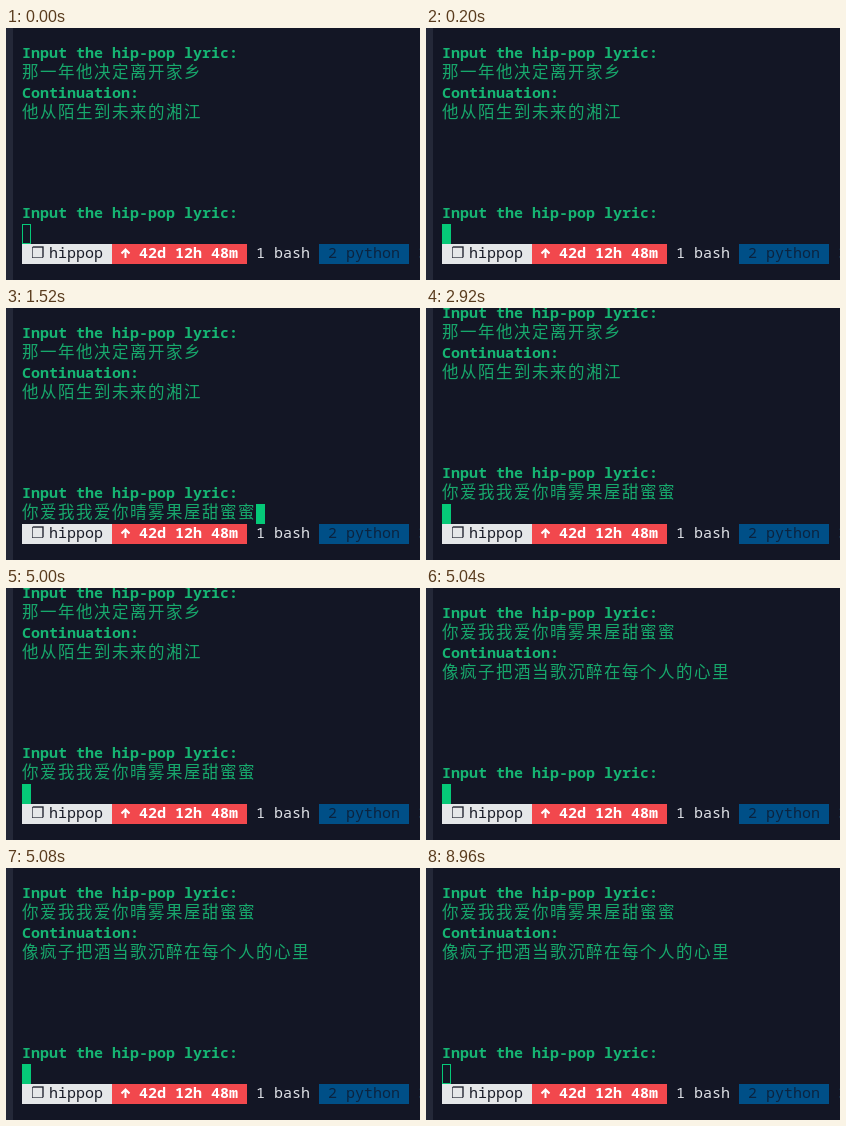
An HTML page with a canvas that plays this animation: 414x252 px, repeating every 9000 ms.

```html
<!DOCTYPE html>
<html lang="zh">
<head>
<meta charset="utf-8">
<style>
  html, body { margin: 0; width: 100%; height: 100%; overflow: hidden; background: #131625; }
  canvas { display: block; }
</style>
</head>
<body>
<canvas id="stage" width="414" height="252"></canvas>
<script>
const ctx = document.getElementById('stage').getContext('2d');
const LOOP = 9000, LEFT = 16, TOP = 16, CELL = 9, ROW = 20, BAR_ROW = 10;
const GREEN = '#16b573', DIM_GREEN = '#17a86c';
const MONO = '15px "Noto Sans Mono", "DejaVu Sans Mono", monospace';
const REGULAR = MONO, BOLD = `600 ${MONO}`;
const HAN = '300 16.5px "Noto Sans CJK SC", "Noto Sans Mono CJK SC", sans-serif';
const SYMBOL = '15px "DejaVu Sans", sans-serif';

const PROMPT = 'Input the hip-pop lyric:';
const FIRST = '那一年他决定离开家乡';
const SECOND = '你爱我我爱你晴雾果屋甜蜜蜜';
const before = [PROMPT, FIRST, 'Continuation:', '他从陌生到未来的湘江', '', '', '', '', PROMPT];
const after = [PROMPT, SECOND, 'Continuation:', '像疯子把酒当歌沉醉在每个人的心里', '', '', '', '', PROMPT];

const x = col => LEFT + col * CELL;
const y = row => TOP + row * ROW;

function print(text, col, row, font, color) {
  ctx.font = font;
  ctx.fillStyle = color;
  ctx.fillText(text, x(col), y(row) + 14);
}

function printLine(text, row) {
  if (/^[ -~]*$/.test(text)) return print(text, 0, row, BOLD, GREEN);
  [...text].forEach((char, i) => print(char, 2 * i, row, HAN, DIM_GREEN));
}

function cursor(col, hollow) {
  ctx.lineWidth = 1;
  ctx.fillStyle = ctx.strokeStyle = '#05c878';
  if (hollow) ctx.strokeRect(x(col) + 0.5, y(9) + 0.5, CELL - 1, ROW - 1);
  else ctx.fillRect(x(col), y(9), CELL, ROW);
}

function segment(col, cells, color) {
  ctx.fillStyle = color;
  ctx.fillRect(x(col), y(BAR_ROW), cells * CELL, ROW);
}

function arrow(col) {
  const mid = x(col) + CELL / 2, top = y(BAR_ROW) + 5;
  ctx.strokeStyle = '#fff';
  ctx.lineWidth = 2;
  ctx.beginPath();
  ctx.moveTo(mid, top + 9);
  ctx.lineTo(mid, top);
  ctx.moveTo(mid - 4, top + 4.5);
  ctx.lineTo(mid, top + 0.5);
  ctx.lineTo(mid + 4, top + 4.5);
  ctx.stroke();
}

function statusBar() {
  segment(0, 10, '#e5e7e9');
  print('❐', 1, BAR_ROW, SYMBOL, '#1a1d29');
  print('hippop', 3, BAR_ROW, REGULAR, '#1a1d29');
  segment(10, 15, '#f2484d');
  arrow(11);
  print('42d 12h 48m', 13, BAR_ROW, BOLD, '#fff');
  print('1 bash', 26, BAR_ROW, REGULAR, '#dfe2e8');
  segment(33, 10, '#004f87');
  print('2 python', 34, BAR_ROW, REGULAR, '#0b2440');
  print('3', 44, BAR_ROW, REGULAR, '#1f3b57');
}

function draw(t) {
  ctx.fillStyle = '#131625';
  ctx.fillRect(0, 0, 414, 252);
  ctx.fillStyle = '#242838';
  ctx.fillRect(0, 0, 7, 252);

  const typed = t >= 1520, entered = t >= 2920, answered = t >= 5040;
  let lines = before;
  if (answered) lines = after;
  else if (typed) lines = [...before, SECOND];

  const scroll = entered && !answered ? 1 : 0;
  lines.forEach((line, i) => printLine(line, i - scroll));
  cursor(typed && !entered ? 2 * SECOND.length : 0, t < 200 || t >= 8960);
  statusBar();
}

const start = performance.now();
function frame() {
  draw((performance.now() - start) % LOOP);
  requestAnimationFrame(frame);
}
frame();
</script>
</body>
</html>
```
